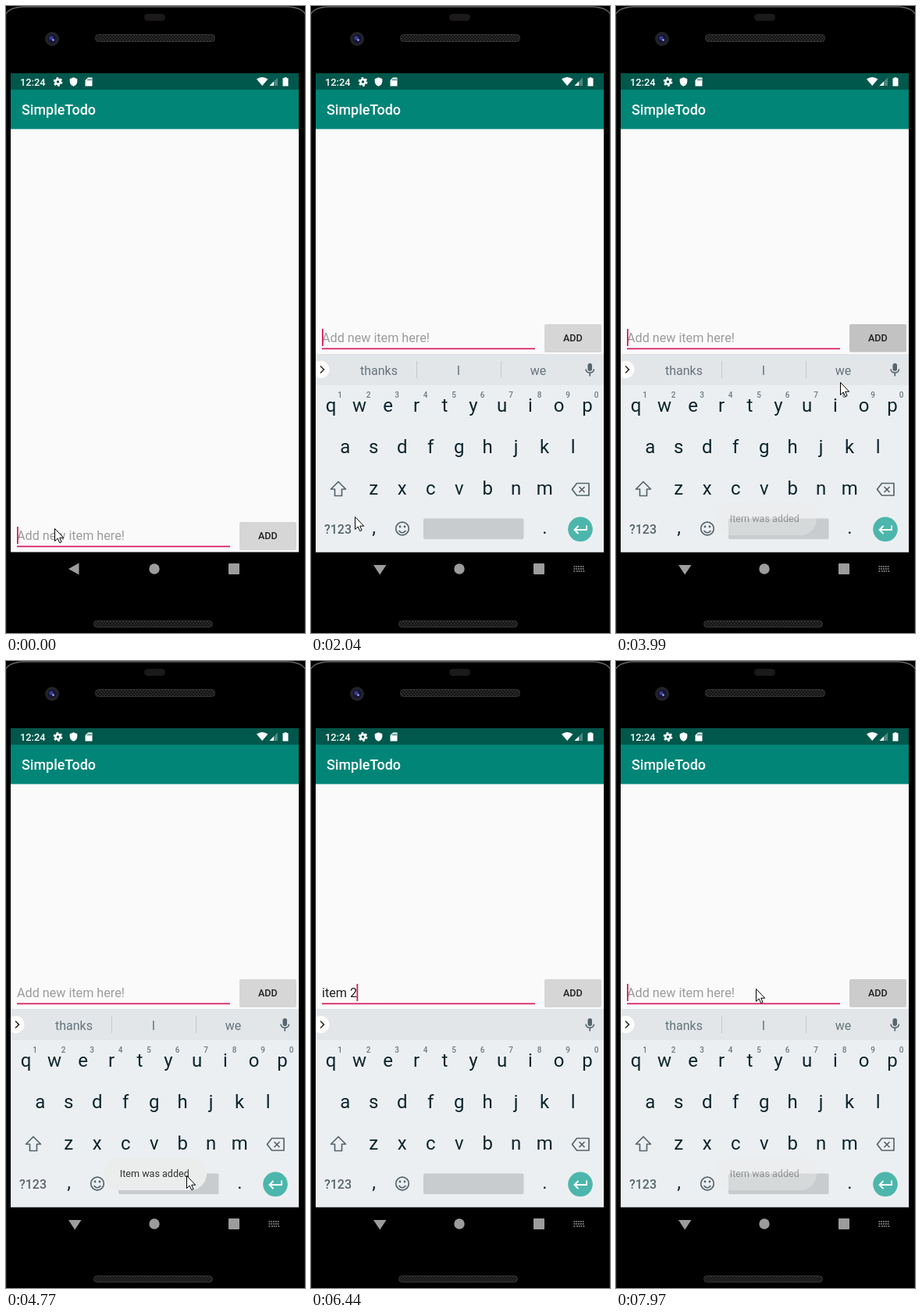
Animation, 383 px wide and 802 px high, one loop 8 s. Source, as an HTML page:

```html
<!DOCTYPE html>
<html lang="en">
<head>
<meta charset="utf-8">
<title>Todo list demo</title>
<style>
  html, body { margin: 0; width: 100%; height: 100%; overflow: hidden; background: #000; }
  svg { display: block; width: 100%; height: 100%; font-family: Roboto, sans-serif; }
  .medium { font-weight: 500; }
  .mid { text-anchor: middle; }
  .line { fill: none; stroke: #56656c; stroke-width: 1.7; stroke-linejoin: round; }
</style>
</head>
<body>
<svg viewBox="0 0 383 802">
  <defs>
    <pattern id="mesh" width="4" height="4" patternUnits="userSpaceOnUse">
      <rect width="4" height="4" fill="#292929"/>
      <path d="M0 0L4 4M4 0L0 4" stroke="#141414"/>
    </pattern>
    <clipPath id="screen"><rect x="6" y="86" width="369" height="612.5"/></clipPath>
  </defs>

  <!-- Phone body -->
  <rect width="383" height="802"/>
  <path d="M0 10Q4 2 22 1H361Q379 2 383 10" fill="none" stroke="#646464" stroke-width="1.5"/>
  <path d="M.5 10V802M382.5 10V802" stroke="#1c1c1c"/>
  <rect x="177" y="10" width="27" height="9" rx="4.5" fill="#1b1919"/>
  <rect x="114.5" y="36.500" width="153" height="9" rx="4" fill="url(#mesh)" stroke="#343434"/>
  <rect x="112.500" y="786.500" width="152" height="8" rx="4" fill="url(#mesh)" stroke="#343434"/>
  <circle cx="59" cy="42" r="9" fill="#232327"/>
  <circle cx="59" cy="42" r="5.500" fill="#14143a"/>
  <circle cx="58" cy="41" r="2.500" fill="#3c3f91"/>
  <circle cx="60.500" cy="43.500" r="1.300" fill="#a9b4ea"/>

  <!-- App bars -->
  <rect x="6" y="86" width="369" height="612.5" fill="#fafafa"/>
  <rect x="6" y="86" width="369" height="21" fill="#00574b"/>
  <rect x="6" y="107" width="369" height="50" fill="#008577"/>
  <path d="M6 157.500H375" stroke="#8fc9c2"/>
  <g fill="#fff">
    <text class="medium" x="18" y="101.500" font-size="12.8">12:24</text>
    <text class="medium" x="20" y="139" font-size="17.96">SimpleTodo</text>
    <circle cx="66.500" cy="97" r="3.100" fill="none" stroke="#fff" stroke-width="2.600"/>
    <circle cx="66.500" cy="97" r="4.900" fill="none" stroke="#fff" stroke-width="2" stroke-dasharray="2.600 2.530"/>
    <path d="M86.500 91.300L91.300 93.300V96.500C91.300 99.500 89.300 101.900 86.500 102.800C83.700 101.900 81.700 99.500 81.700 96.500V93.300Z"/>
    <path d="M105 91.500H110.500V102.500H101.500V95Z"/>
    <path d="M105 93V95.500M107 93V95.500M109 93V95.500" stroke="#00574b"/>
    <path d="M321 93.500Q328 88.500 335.500 93.500L328.200 102Z"/>
    <path d="M348 91.500V102H337.500Z" fill="#4b887f"/>
    <path d="M343 96.500V102H337.500Z"/>
    <path d="M356.500 91.200H359.500V92.300H361.500V102.500H354.500V92.300H356.500Z"/>
  </g>

  <!-- Input row -->
  <g id="row">
    <text id="entry" x="14" y="683" font-size="16.16" xml:space="preserve"></text>
    <rect x="14" y="690.500" width="273" height="1.700" fill="#d81b60"/>
    <rect id="caret" y="666" width="1.800" height="22" fill="#d81b60"/>
    <rect x="299" y="661" width="73" height="35" rx="2" fill="#b9b9b9" opacity=".6"/>
    <rect id="button" x="299" y="660" width="73" height="35" rx="2"/>
    <text class="medium mid" x="335.300" y="682" font-size="12.57" fill="#212121">ADD</text>
  </g>

  <!-- Keyboard -->
  <g id="keyboard" clip-path="url(#screen)">
    <rect x="6" y="445" width="369" height="254" fill="#eceff1"/>
    <rect x="6" y="445" width="369" height="40" fill="#e2e6e9"/>
    <circle cx="12.500" cy="465" r="11" fill="#fff"/>
    <path d="M12 460.500L16.500 465L12 469.500" fill="none" stroke="#333" stroke-width="1.700"/>
    <g id="words" font-size="16" fill="#66747b" class="mid">
      <path d="M135.500 454V476M243.500 454V476" stroke="#c3c9cc"/>
      <text x="87" y="472"></text><text x="189" y="472"></text><text x="291" y="472"></text>
    </g>
    <rect x="354.500" y="457" width="5.500" height="10" rx="2.750" fill="#56656c"/>
    <path class="line" d="M352 464.500A5.300 5.300 0 0 0 362.500 464.500M357.250 470V473.500"/>
    <g id="keys" fill="#0c252e" font-size="24" class="mid"></g>
    <text class="medium mid" x="34.500" y="674.500" font-size="16" fill="#56656c">?123</text>
    <path class="line" d="M35 608.500L44.500 618H39.500V626.500H30.500V618H25.500Z"/>
    <path class="line" d="M340.500 610.500H356V626H340.500L334.500 618.200ZM343.500 615L350.500 622M350.500 615L343.500 622"/>
    <circle class="line" cx="117" cy="668.500" r="8.300"/>
    <path class="line" d="M112.500 671Q117 676.500 121.500 671"/>
    <circle cx="114" cy="666" r="1.400" fill="#56656c"/><circle cx="120" cy="666" r="1.400" fill="#56656c"/>
    <rect x="144" y="655.500" width="128.500" height="26.500" rx="2" fill="#c8ccce"/>
    <circle cx="345" cy="669.300" r="15.800" fill="#4db6ac"/>
    <path d="M353 664.500V670H338M342.500 665L337.500 670L342.500 675" fill="none" stroke="#fff" stroke-width="1.900"/>
  </g>

  <g id="toast">
    <rect x="125" y="635" width="132" height="42" rx="21" fill="#ebecec"/>
    <text class="mid" x="190.300" y="660.300" font-size="12.57" fill="#333">Item was added</text>
  </g>

  <!-- Navigation -->
  <g fill="#9c9c9c">
    <path id="back"/>
    <circle cx="190" cy="720" r="6.700"/>
    <rect x="285" y="713" width="14" height="14" rx="1"/>
    <path id="switcher" d="M336.500 717H350.500M336.500 720H350.500M336.500 723H338.500M340 723H347M348.500 723H350.500" stroke="#9c9c9c" stroke-width="1.700" stroke-dasharray="1.800 1"/>
  </g>

  <path id="pointer" d="M.5.5V16.500L4.200 13L6.700 18.600L9.100 17.600L6.700 12.200H11.700Z" fill="#fff" stroke="#000"/>
</svg>

<script>
const $ = id => document.getElementById(id);
const HINT = 'Add new item here!';
const NEXT = ['thanks', 'I', 'we'], STEM = ['it', 'item', 'items'], NONE = ['', '', ''];
const DURATION = 8000;

function addKey(char, x, y, style = {}) {
  const key = document.createElementNS('http://www.w3.org/2000/svg', 'text');
  Object.entries({ x, y, ...style }).forEach(([name, value]) => key.setAttribute(name, value));
  key.textContent = char;
  $('keys').append(key);
}
[['qwertyuiop', 25.5, 519], ['asdfghjkl', 43.7, 572], ['zxcvbnm', 80.2, 625]].forEach(
  ([letters, left, y]) => [...letters].forEach((char, i) => addKey(char, left + i * 36.5, y)));
[...'1234567890'].forEach((char, i) => addKey(char, 37 + i * 36.5, 501.3,
  { 'font-size': 10, 'font-weight': 500, fill: '#6c7a81' }));
addKey(',', 80.5, 675);
addKey('.', 299.5, 675);

// Each step lists only what changes at that time.
const steps = [
  [0, { at: [62, 668], caret: 1, text: '', words: NONE, toast: 0, gray: 214, keyboard: false }],
  [150, { at: [88, 683], caret: 0 }],
  [280, { at: [111, 662] }],
  [410, { at: [86, 641] }],
  [540, { at: [56, 639], caret: 1 }],
  [850, { at: [54, 643] }],
  [970, { at: [55, 649] }],
  [1090, { at: [56, 653], caret: 0 }],
  [1620, { caret: 1 }],
  [1900, { keyboard: true, words: NEXT }],
  [2070, { text: 'it', words: STEM }],
  [2240, { text: 'item' }],
  [2410, { text: 'item 1', words: NONE }],
  [2810, { caret: 0 }],
  [2930, { at: [90, 600] }],
  [3080, { at: [165, 490] }],
  [3230, { at: [245, 385] }],
  [3380, { at: [298, 343], caret: 1 }],
  [3530, { at: [325, 375] }],
  [3680, { at: [332, 412] }],
  [3840, { at: [331, 424], gray: 200 }],
  [3990, { at: [287, 481], text: '', words: NEXT, toast: .42, gray: 194 }],
  [4110, { at: [262, 545], toast: 1, gray: 205 }],
  [4240, { at: [238, 605], gray: 214 }],
  [4370, { at: [228, 640] }],
  [4500, { at: [228, 652], caret: 0 }],
  [4630, { at: [230, 657] }],
  [4770, { at: [231, 658] }],
  [4920, { at: [152, 484] }],
  [5040, { at: [118, 446], caret: 1 }],
  [5190, { at: [98, 428] }],
  [5340, { at: [92, 422] }],
  [5900, { at: null, text: 'i', words: STEM, toast: .75 }],
  [6030, { text: 'it', toast: .4 }],
  [6160, { text: 'item', toast: .12 }],
  [6290, { text: 'item ', toast: 0 }],
  [6440, { text: 'item 2', words: NONE }],
  [6870, { caret: 0 }],
  [7150, { at: [130, 370] }],
  [7280, { at: [225, 319] }],
  [7410, { at: [300, 375], caret: 1 }],
  [7540, { at: [321, 434] }],
  [7820, { at: [318, 431], gray: 198 }],
  [7970, { at: [179, 419], text: '', words: NEXT, toast: .42, gray: 204 }],
];

const show = (id, visible) => $(id).setAttribute('visibility', visible ? 'visible' : 'hidden');

function draw(state) {
  const { at, caret, text, words, toast, gray, keyboard } = state;
  show('keyboard', keyboard);
  show('switcher', keyboard);
  $('row').setAttribute('transform', `translate(0 ${keyboard ? -253 : 0})`);
  $('back').setAttribute('d', keyboard ? 'M80 715H96.500L88.200 727.500Z' : 'M80 720L93.500 712.500V727.500Z');

  $('entry').textContent = text || HINT;
  $('entry').setAttribute('fill', text ? '#212121' : '#9b9b9b');
  $('caret').setAttribute('x', text ? 13.4 + $('entry').getComputedTextLength() : 14);
  show('caret', caret);
  $('button').setAttribute('fill', `rgb(${gray} ${gray} ${gray})`);

  $('words').setAttribute('opacity', words === NONE ? 0 : 1);
  $('words').querySelectorAll('text').forEach((label, i) => { label.textContent = words[i]; });
  $('toast').setAttribute('opacity', toast);

  show('pointer', at);
  if (at) $('pointer').setAttribute('transform', `translate(${at})`);
}

const start = performance.now();
function tick() {
  const time = (performance.now() - start) % DURATION;
  const passed = steps.filter(([from]) => from <= time).map(([, change]) => change);
  draw(Object.assign({}, ...passed));
  requestAnimationFrame(tick);
}
tick();
</script>
</body>
</html>
```
